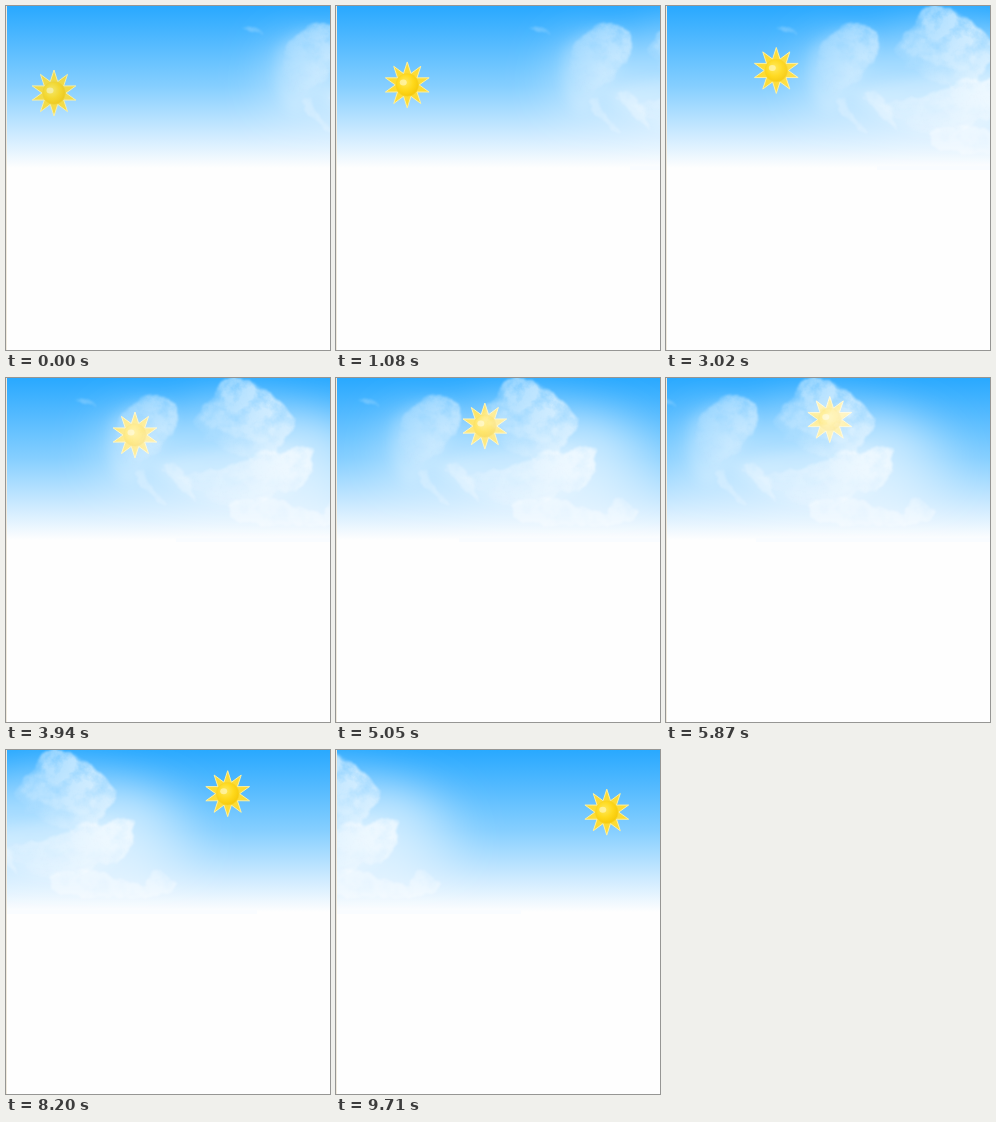
These frames come from a looping animation (324x344 px, 9.78 s). An HTML page:

```html
<!DOCTYPE html>
<html>
<head>
<meta charset="utf-8">
<style>
html, body { margin: 0; width: 100%; height: 100%; overflow: hidden; background: #fefefe }
svg { display: block }
</style>
</head>
<body>
<svg width="324" height="344" viewBox="0 0 324 344">
  <defs>
    <linearGradient id="sky" x2="0" y2="1">
      <stop stop-color="#29a9ff"/>
      <stop offset=".06" stop-color="#34adff"/>
      <stop offset=".5" stop-color="#86cfff"/>
      <stop offset=".8" stop-color="#cfebff"/>
      <stop offset="1" stop-color="#fefefe"/>
    </linearGradient>
    <radialGradient id="ball" cx=".4" cy=".38" r=".65">
      <stop stop-color="#ffe95a"/>
      <stop offset=".55" stop-color="#ffd91c"/>
      <stop offset="1" stop-color="#f6c808"/>
    </radialGradient>
    <linearGradient id="lit" x1=".1" y1=".9" x2=".85" y2=".2">
      <stop stop-color="#fff" stop-opacity="0"/>
      <stop offset=".5" stop-color="#fff" stop-opacity=".5"/>
      <stop offset="1" stop-color="#fff"/>
    </linearGradient>
    <filter id="haze" filterUnits="userSpaceOnUse" x="0" y="-90" width="480" height="320">
      <feGaussianBlur stdDeviation="20"/>
    </filter>
    <filter id="soft" filterUnits="userSpaceOnUse" x="40" y="-40" width="400" height="240">
      <feGaussianBlur stdDeviation="6"/>
    </filter>
    <filter id="fluff" filterUnits="userSpaceOnUse" x="40" y="-30" width="380" height="210" color-interpolation-filters="sRGB">
      <feTurbulence type="fractalNoise" baseFrequency=".06" numOctaves="4" seed="7" result="noise"/>
      <feDisplacementMap in="SourceGraphic" in2="noise" scale="11" xChannelSelector="R" yChannelSelector="G"/>
      <feGaussianBlur stdDeviation="1" result="shape"/>
      <feColorMatrix in="noise" values="0 0 0 0 1  0 0 0 0 1  0 0 0 0 1  1.3 0 0 0 .25"/>
      <feComposite in="shape" operator="in"/>
    </filter>
    <clipPath id="strip"><path d="M1 0H324V164H1z"/></clipPath>
  </defs>

  <rect width="324" height="162" fill="url(#sky)"/>

  <g id="sun">
    <polygon id="rays" fill="#fddc34" stroke="#fdf0a0" stroke-width="1"/>
    <circle r="11.3" fill="url(#ball)" stroke="#f5d22c" stroke-width=".6"/>
    <ellipse cx="-4" cy="-2.5" rx="3.5" ry="3" fill="#fff6b8" opacity=".7"/>
  </g>

  <g clip-path="url(#strip)">
    <g id="clouds" fill="#fff">
      <path d="M170 160H430V164H170z" fill="#f9fcff"/>
      <g filter="url(#haze)">
        <ellipse cx="125" cy="75" rx="38" ry="48" opacity=".28"/>
        <ellipse cx="235" cy="80" rx="100" ry="62" opacity=".38"/>
        <ellipse cx="310" cy="90" rx="62" ry="58" opacity=".32"/>
      </g>
      <g filter="url(#soft)">
        <path opacity=".18" d="M104 42Q125 18 152 22Q174 26 168 44Q158 62 150 78Q135 100 120 108Q96 90 104 42z"/>
        <path opacity=".22" d="M145 86Q200 70 270 65Q300 70 302 88Q290 115 255 130Q190 132 145 86z"/>
      </g>
      <g filter="url(#fluff)">
        <path fill="url(#lit)" opacity=".42" d="M116 36Q130 18 150 17Q174 19 174 38Q171 54 156 62Q154 74 142 80Q130 94 114 92Q102 60 116 36z"/>
        <path opacity=".24" d="M127 94Q136 88 141 100Q148 116 164 128Q150 124 138 112z"/>
        <path opacity=".28" d="M158 86Q172 82 180 95Q190 112 192 128Q178 112 162 98z"/>
        <path fill="url(#lit)" opacity=".65" d="M187 48Q190 32 203 26Q208 6 226 1Q242 -3 251 13Q271 13 277 30Q291 37 286 52Q283 65 273 67Q273 79 256 77Q236 79 218 70Q198 66 187 48z"/>
        <path opacity=".16" d="M194 42Q214 6 240 2Q262 14 270 36Q276 54 258 66Q228 62 194 42z"/>
        <path fill="url(#lit)" opacity=".6" d="M172 96Q200 98 232 86Q252 70 276 74Q302 62 308 77Q309 94 300 102Q290 115 270 114Q258 130 236 130Q202 126 172 96z"/>
        <path opacity=".4" d="M225 126Q260 112 285 126Q305 133 318 136Q325 117 334 122Q342 128 351 134Q345 142 325 146Q270 152 225 140z"/>
        <path opacity=".22" d="M69 21Q80 18 90 28Q80 26 69 21z"/>
      </g>
    </g>
  </g>

  <path d="M0 0H1V344H0z" fill="#efe9dc"/>
</svg>
<script>
const LOOP = 9780, FIRST = 50, STEP = 64.83;
const CLOUD_SPEED = 0.0424, CLOUD_START = 167;
// time, x, y
const sunPath = [
  [0, 48, 87], [1010, 71, 79], [2120, 94, 71], [3940, 129, 57], [5050, 149, 48],
  [6720, 181, 34], [8200, 223, 44], [9780, 273, 63]
];
const byId = id => document.getElementById(id);
const sun = byId('sun'), clouds = byId('clouds');

byId('rays').setAttribute('points', Array.from({ length: 20 }, (_, i) => {
  const r = i % 2 ? 12 : 23, a = i * Math.PI / 10;
  return [r * Math.sin(a), -r * Math.cos(a)].map(v => v.toFixed(2));
}).join(' '));

function sunAt(t) {
  const i = sunPath.findIndex(p => p[0] > t);
  const [a, b] = [sunPath[i - 1], sunPath[i]];
  const k = (t - a[0]) / (b[0] - a[0]);
  return [1, 2].map(n => a[n] + (b[n] - a[n]) * k);
}

const move = (el, x, y) => el.setAttribute('transform', `translate(${x} ${y})`);

function draw(now) {
  const time = now % LOOP;
  const t = time < FIRST ? 0 : FIRST + Math.floor((time - FIRST) / STEP) * STEP;
  move(sun, ...sunAt(t));
  sun.setAttribute('opacity', Math.min(1, 0.9 + t / 10000));
  move(clouds, Math.round(CLOUD_START - t * CLOUD_SPEED), 0);
  requestAnimationFrame(draw);
}
draw(performance.now());
</script>
</body>
</html>
```
